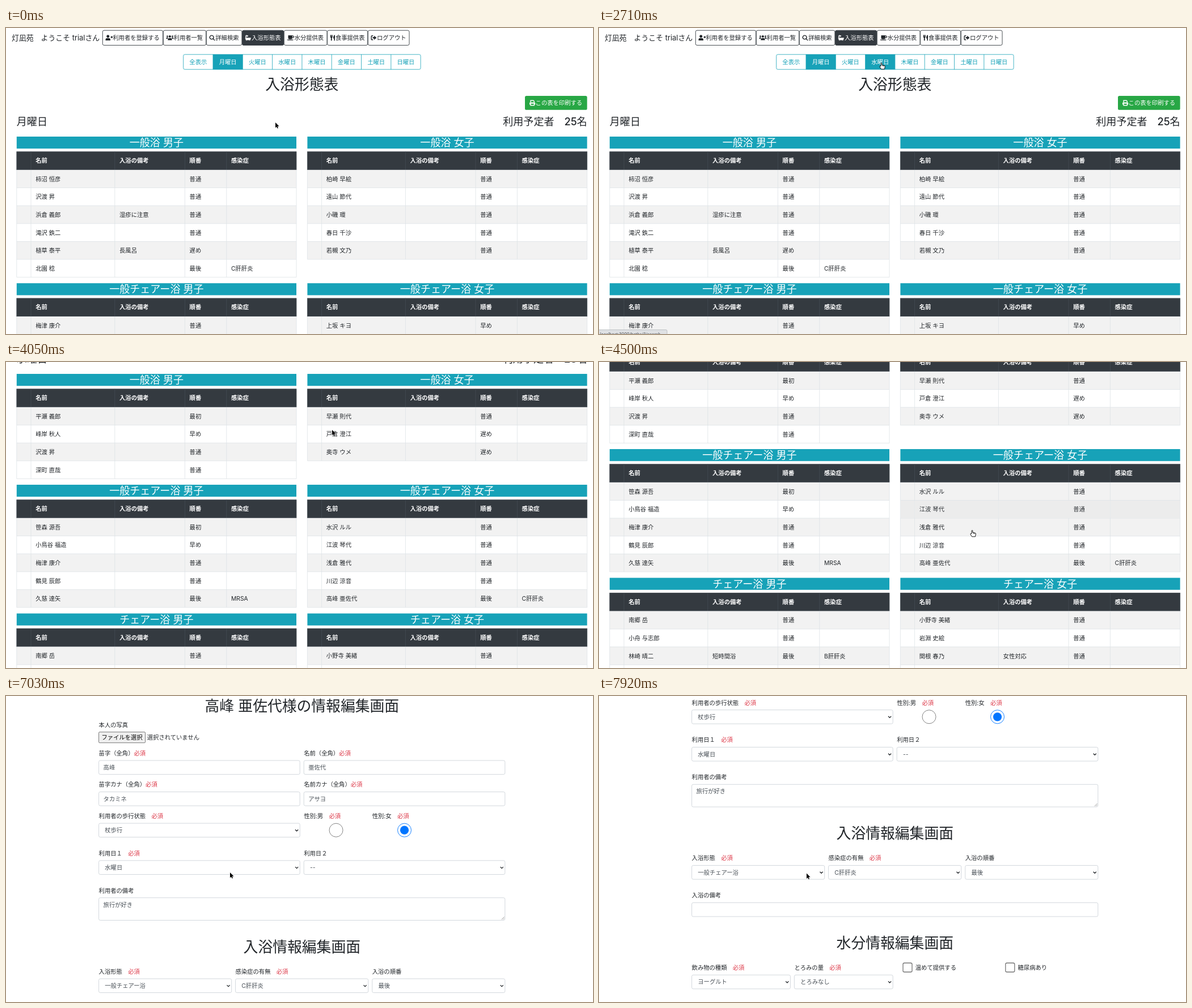
Animation of 1035x541 px, one loop 8000 ms. Source, as an HTML page:

```html
<!DOCTYPE html>
<html lang="ja">
<head>
<meta charset="utf-8">
<title>入浴形態表</title>
<style>
html, body { margin: 0; width: 100%; height: 100%; overflow: hidden; background: #fff; }
svg { display: block; width: 100%; height: 100%; }
text { font-family: Inter, "Noto Sans CJK JP", "Noto Sans CJK", sans-serif; text-spacing-trim: space-all; white-space: pre; }
#rowHover { mix-blend-mode: darken; }
</style>
</head>
<body>
<svg id="stage" viewBox="0 0 1035 541"></svg>
<script>
const BASE = 10.32, H1 = 25.8, H3 = 18.06;
const INK = '#212529', DARK = '#343a40', TEAL = '#17a2b8', RED = '#dc3545';
const ROW = 31.62, COLS = [0, 25.2, 173, 296.6, 370, 493.2];

// y is the vertical middle of the text
const text = (x, y, s, { size = BASE, fill = INK, anchor = 'start', weight = 400 } = {}) =>
  `<text x="${x}" y="${y + size * .37}" font-size="${size}" fill="${fill}" text-anchor="${anchor}" font-weight="${weight}">${s}</text>`;
const rect = (x, y, w, h, fill, extra = '') =>
  `<rect x="${x}" y="${y}" width="${w}" height="${h}" fill="${fill}" ${extra}/>`;
const path = (d, stroke, w = .8, fill = 'none', extra = '') =>
  `<path d="${d}" stroke="${stroke}" stroke-width="${w}" fill="${fill}" ${extra}/>`;
const heading = (y, s) => text(521.8, y, s, { size: H1, anchor: 'middle' });

// Icons: [filled part, stroked part], left edge at 0, middle at 0
const ICONS = {
  add: ['M4.3-5a2.5 2.5 0 1 1-.1 0ZM0 4.8V3Q0 .6 2.4 .6H6Q8.5 .6 8.5 3V4.8Z', 'M9-1.1h3.8M10.9-3v3.8'],
  users: ['M6.4-4.4a2.1 2.1 0 1 1-.1 0ZM2-4.1a1.4 1.4 0 1 1-.1 0ZM11-4.1a1.4 1.4 0 1 1-.1 0ZM2.8 4.2V2.8Q2.8 .7 5 .7H8Q10.1 .7 10.1 2.8V4.2ZM0 1.8V.8Q0-.7 1.5-.7H3.5L2.4 1.8ZM12.9 1.8V.8Q12.9-.7 11.4-.7H9.4L10.5 1.8Z', ''],
  search: ['', 'M4.2-4.2a3.4 3.4 0 1 1-.1 0ZM6.7 1.8 9.6 4.7'],
  bath: ['M0 0H10.2V1.2H9.7V2.2Q9.5 3.6 8.7 4V5H7.6V4.3H2.6V5H1.5V4Q.6 3.5 .5 2.2V1.2H0Z', 'M1.2 0V-2.8Q1.2-4.1 2.4-4.1T3.7-3M2.8-2.1 5.2-3.6'],
  cup: ['M2-4.2H9.3V.4Q9.3 2.4 7.3 2.4H4Q2 2.4 2 .4ZM0 3.3H11.4Q11 4.5 10 4.5H1.5Q.3 4.5 0 3.3Z', 'M9-3.4H10.2Q11.8-3.3 11.8-1.8T10.2-.2H9'],
  fork: ['M0-5H1.1V-2H1.5V-5H2.5V-2H2.9V-5H4V-1.5Q4-.3 2.9 .2V5H1.1V.2Q0-.3 0-1.5ZM8.2-5V5H6.6V1.2H5.2Q5.2-4.4 8.2-5Z', ''],
  exit: ['M3-1.3H5.6V-3.7L9.8 0 5.6 3.7V1.3H3Z', 'M3.8-3.5H1.6Q.7-3.5 .7-2.6V2.6Q.7 3.5 1.6 3.5H3.8'],
  print: ['M0 3V.5Q0-.9 1.4-.9H8.8Q10.2-.9 10.2 .5V3H8.8V1.3H1.4V3Z', 'M2-.9V-4.1H7L8.2-2.9V-.9M2 1.6V4.3H8.2V1.6']
};
const icon = (name, x, y, color) =>
  `<g transform="translate(${x} ${y})">${path(ICONS[name][0], 'none', 0, color)}${path(ICONS[name][1], color, 1.4)}</g>`;

const MENU = [
  [170, 277, 188.3, '利用者を登録する', 'add'], [277, 353, 295.6, '利用者一覧', 'users'],
  [353, 416.2, 369.3, '詳細検索', 'search'], [416.2, 490, 433, '入浴形態表', 'bath'],
  [490, 566.3, 508.6, '水分提供表', 'cup'], [566.3, 638, 580.9, '食事提供表', 'fork'],
  [638, 711.3, 654, 'ログアウト', 'exit']
];
function menuButton([x0, x1, tx, label, pic], fill = '#fff', color = INK) {
  return rect(x0 + .3, 4.2, x1 - x0 - .6, 26.3, fill, 'rx="2.6"') +
    icon(pic, x0 + 5.5, 17.3, color) + text(tx, 17.3, label, { fill: color });
}
const menuBorder = ([x0, x1]) =>
  rect(x0 + .3, 4.2, x1 - x0 - .6, 26.3, 'none', `rx="2.6" stroke="${DARK}" stroke-width=".9"`);
// One item may be drawn in other colours: [fill, text]
const navbar = (item, colors) => text(10, 17, '灯凪苑　ようこそ trialさん', { size: 12.9 }) +
  MENU.map((m, i) => menuButton(m, ...(i === item ? colors : [])) + menuBorder(m)).join('');

const DAYS = ['全表示', ...'月火水木金土日'].map((d, i) => i ? d + '曜日' : d);
const DAY_W = 52.3, DAY_X = 312.7;
function dayButton(i, on) {
  const x = DAY_X + i * DAY_W;
  return (on ? rect(x, 46.8, DAY_W, 26.4, TEAL) : '') +
    text(x + DAY_W / 2, 60, DAYS[i], { fill: on ? '#fff' : TEAL, anchor: 'middle' });
}
function dayBar(active) {
  const lines = DAYS.map((_, i) => i ? `M${DAY_X + i * DAY_W} 46.8v26.4` : '').join('');
  return DAYS.map((_, i) => dayButton(i, i === active)).join('') + path(lines, TEAL) +
    rect(DAY_X, 46.8, DAY_W * 8, 26.4, 'none', `rx="2.6" stroke="${TEAL}" stroke-width=".8"`);
}

// A row is "name,note,order,infection"
function table(x, y, title, rows) {
  const top = y + 58.9, h = rows.length * ROW, at = i => x + COLS[i];
  let out = rect(x, y, 493.2, 21.2, TEAL) +
    text(x + 246.6, y + 10.3, title, { size: H3, fill: '#fff', anchor: 'middle' }) +
    rect(x, y + 26.5, 493.2, 32.4, DARK) +
    path(COLS.map((_, i) => `M${at(i)} ${y + 26.5}v32.4`).join('') + `M${x} ${top - .5}h493.2M${x} ${y + 26.8}h493.2`, '#454d55');
  ['名前', '入浴の備考', '順番', '感染症'].forEach((s, i) =>
    out += text(at(i + 1) + 8.2, y + 42.4, s, { fill: '#fff', weight: 700 }));
  let grid = COLS.map((_, i) => `M${at(i)} ${top}v${h}`).join('');
  rows.forEach((row, r) => {
    const ry = top + r * ROW;
    if (r % 2 === 0) out += rect(x, ry, 493.2, ROW, '#f2f2f2');
    grid += `M${x} ${ry + ROW}h493.2`;
    const [name, note = '', order = '普通', infection = ''] = row.split(',');
    [name, note, order, infection].forEach((s, i) => {
      if (s) out += text(at(i + 1) + 8.2, ry + 16, s);
    });
  });
  return out + path(grid, '#dee2e6');
}

function bathPage(day, count, sections) {
  let y = 192, out = navbar(3, [DARK, '#fff']) + dayBar(day) + heading(99.3, '入浴形態表') +
    rect(915, 120, 109.6, 24.8, '#28a745', 'rx="2.6"') + icon('print', 923, 132.4, '#fff') +
    text(933.6, 132.3, 'この表を印刷する', { fill: '#fff' }) +
    text(18.8, 165.8, DAYS[day], { size: H3 }) +
    text(1024.6, 165.8, `利用予定者　<tspan font-weight="500">${count}</tspan>名`, { size: H3, anchor: 'end' });
  for (const [title, men, women] of sections) {
    out += table(18.8, y, title + ' 男子', men) + table(531.4, y, title + ' 女子', women);
    y += 69.5 + Math.max(men.length, women.length) * ROW;
  }
  return out;
}

const MONDAY = [
  ['一般浴',
    ['柿沼 恒彦', '沢渡 昇', '浜倉 義郎,湿疹に注意', '滝沢 鉄二', '植草 泰平,長風呂,遅め', '北園 稔,,最後,C肝肝炎'],
    ['柏崎 早絵', '遠山 節代', '小磯 環', '春日 千沙', '若槻 文乃']],
  ['一般チェアー浴', ['梅津 康介'], ['上坂 キヨ,,早め']]
];
const WEDNESDAY = [
  ['一般浴',
    ['平瀬 義郎,,最初', '峰岸 秋人,,早め', '沢渡 昇', '深町 直哉'],
    ['早瀬 則代', '戸倉 澄江,,遅め', '奥寺 ウメ,,遅め']],
  ['一般チェアー浴',
    ['笹森 源吾,,最初', '小鳥谷 福造,,早め', '梅津 康介', '鶴見 辰郎', '久慈 達矢,,最後,MRSA'],
    ['水沢 ルル', '江波 琴代', '浅倉 雅代', '川辺 涼音', '高峰 亜佐代,,最後,C肝肝炎']],
  ['チェアー浴',
    ['南郷 岳', '小舟 与志郎', '林崎 晴二,短時間浴,最後,B肝肝炎', ',,'],
    ['小野寺 美緒', '岩淵 史絵', '関根 春乃,女性対応', ',,']]
];

const label = (x, y, s, must = '') => text(x, y, `${s}<tspan fill="${RED}">${must}</tspan>`);
const field = (x, y, w, s = '', pad = 8, h = 24.6) =>
  rect(x, y, w, h, '#fff', 'rx="2.6" stroke="#ced4da" stroke-width=".9"') +
  text(x + pad, y + 12.3, s, { fill: '#495057' });
const select = (x, y, w, s) => field(x, y, w, s, 10.7) +
  path(`M${x + w - 8.2} ${y + 11.2}l2.6 2.6 2.6-2.6`, INK, 1.3);
const radio = (x, color, on) => `<circle cx="${x}" cy="282.2" r="12" fill="#fff" stroke="${color}" stroke-width=".9"/>` +
  (on ? `<circle cx="${x}" cy="282.2" r="7.6" fill="${color}"/>` : '');
const check = (x, s) => rect(x, 717.4, 16, 16, '#fff', 'rx="2.6" stroke="#767676" stroke-width="1.3"') + label(x + 21.8, 725.6, s);

function editPage() {
  const L = 163.6, R = 525.2, W = 354.6, FULL = 716.2, MUST = '必須';
  return `<g id="nav">${navbar()}</g><g id="navFade">${navbar(1, ['#bbbdbf', '#70757a'])}</g>` +
    heading(62.3, '高峰 亜佐代様の情報編集画面') +
    label(L, 95.7, '本人の写真') +
    rect(L, 108.7, 82, 19, '#efefef', 'rx="1.5" stroke="#6b6b6b" stroke-width=".9"') +
    text(168.5, 118.2, 'ファイルを選択', { fill: '#000' }) + label(248.8, 118.2, '選択されていません') +
    label(L, 145.9, '苗字（全角）', MUST) + label(R, 145.9, '名前（全角）', MUST) +
    field(L, 159, W, '高峰') + field(R, 159, W, '亜佐代') +
    label(L, 201.5, '苗字カナ（全角）', MUST) + label(R, 201.5, '名前カナ（全角）', MUST) +
    field(L, 214.5, W, 'タカミネ') + field(R, 214.5, W, 'アサヨ') +
    label(L, 257.1, '利用者の歩行状態　', MUST) + label(R, 257.1, '性別:男　', MUST) + label(645.7, 257.1, '性別:女　', MUST) +
    select(L, 270, W, '杖歩行') + radio(582, '#767676') + radio(702.5, '#0075ff', true) +
    label(L, 323, '利用日１　', MUST) + label(R, 323, '利用日２') +
    select(L, 335.9, W, '水曜日') + select(R, 335.9, W, '--') +
    label(L, 388.7, '利用者の備考') + field(L, 401.7, FULL, '旅行が好き', 8, 39.8) +
    path('M873.8 440.2l4.8-4.8m-2.2 4.8l2.2-2.2', '#777', .7) +
    heading(488.3, '入浴情報編集画面') +
    label(L, 532, '入浴形態　', MUST) + label(404.6, 532, '感染症の有無　', MUST) + label(645.7, 532, '入浴の順番') +
    select(L, 544.9, 234.1, '一般チェアー浴') + select(404.6, 544.9, 234.1, 'C肝肝炎') + select(645.7, 544.9, 234.1, '最後') +
    label(L, 597.8, '入浴の備考') + field(L, 610.8, FULL) +
    heading(681.8, '水分情報編集画面') +
    label(L, 725.6, '飲み物の種類　', MUST) + label(344.4, 725.6, 'とろみの量　', MUST) +
    check(536, '温めて提供する') + check(716.8, '糖尿病あり') +
    select(L, 738.6, 173.8, 'ヨーグルト') + select(344.4, 738.6, 173.8, 'とろみなし');
}

const HAND = 'M-.9 5.4V.5A.9 .9 0 0 1 .9 .5V3.5L5.2 4.3Q6.5 4.7 6.3 6L5.5 10.8H-.4L-3 6.7Q-3.4 5.1 -2 5.2ZM2.4 3.8V5.6M4.2 4.1V5.7';
const ARROW = 'M0 0V9.4L2.1 7.4 3.5 10.6 5 9.9 3.7 6.8H6.6Z';

const $ = id => document.getElementById(id);
$('stage').innerHTML =
  `<g id="mon">${bathPage(1, 25, MONDAY)}<g id="dayHover">${dayButton(3, true)}</g></g>` +
  `<g id="wed">${bathPage(3, 23, WEDNESDAY)}${rect(531.4, 446.9, 493.2, ROW, '#ececec', 'id="rowHover"')}</g>` +
  `<g id="edit">${editPage()}</g>` +
  `<g id="status">${rect(-2, 533.6, 122, 14, '#dfe1e4', 'rx="2" stroke="#b4b6ba" stroke-width=".8"')}` +
  text(2, 540.8, 'localhost:3000/baths/3/search', { size: 7.3, fill: '#4a4d51' }) + '</g>' +
  `<g id="cursor">${path(ARROW, '#fff', .7, '#000', 'id="arrow" paint-order="stroke"')}${path(HAND, '#000', .9, '#fff', 'id="hand"')}</g>`;

// Keys are [tick, value...]
const SCROLL_WED = [[22, 0], [23, 50], [24, 118], [25, 171], [26, 204], [27, 225], [28, 234]];
const SCROLL_EDIT = [[44, 0], [45, 45], [46, 112], [47, 168], [48, 206.6], [49, 228], [50, 240], [51, 245.4]];
const POINTER = [[0, 475, 167], [3, 491, 115], [7, 512, 65], [12, 512, 65], [13, 501, 63], [15, 498, 62], [22, 498, 62],
  [23, 512, 72], [25, 575, 120], [28, 658, 298], [29, 645, 316], [31, 630, 350], [38, 630, 350],
  [40, 500, 327], [42, 395, 312], [48, 395, 312], [51, 366, 313.5]];

function track(keys, k) {
  const i = keys.findIndex(key => key[0] >= k);
  if (i <= 0) return (i ? keys[keys.length - 1] : keys[0]).slice(1);
  const a = keys[i - 1], b = keys[i], p = (k - a[0]) / (b[0] - a[0]);
  return a.slice(1).map((v, j) => v + (b[j + 1] - v) * p);
}
const show = (id, on) => $(id).style.display = on ? '' : 'none';
const shift = (id, x, y) => $(id).setAttribute('transform', `translate(${x} ${y})`);

function render(ms) {
  // The screen refreshes in ticks of about 149 ms
  const k = ms < 500 ? 0 : Math.floor((ms - 1366) / 148.9) + 7;
  const hand = (k >= 13 && k <= 23) || (k >= 28 && k <= 36);
  show('mon', k < 18);
  show('wed', k >= 18 && k < 36);
  show('edit', k >= 36);
  show('dayHover', k >= 13);
  $('dayHover').setAttribute('opacity', k === 13 ? .5 : 1);
  show('status', k >= 15 && k < 20);
  show('rowHover', k >= 28);
  shift('rowHover', 0, ROW * (k < 29 ? 1 : k < 31 ? 2 : 4));
  show('nav', k !== 36);
  show('navFade', k === 36);
  shift('wed', 0, -track(SCROLL_WED, k)[0]);
  shift('edit', 0, -track(SCROLL_EDIT, k)[0]);
  shift('cursor', ...track(POINTER, k));
  show('hand', hand);
  show('arrow', !hand);
}

const start = performance.now();
function loop() {
  render((performance.now() - start) % 8000);
  requestAnimationFrame(loop);
}
loop();
</script>
</body>
</html>
```
